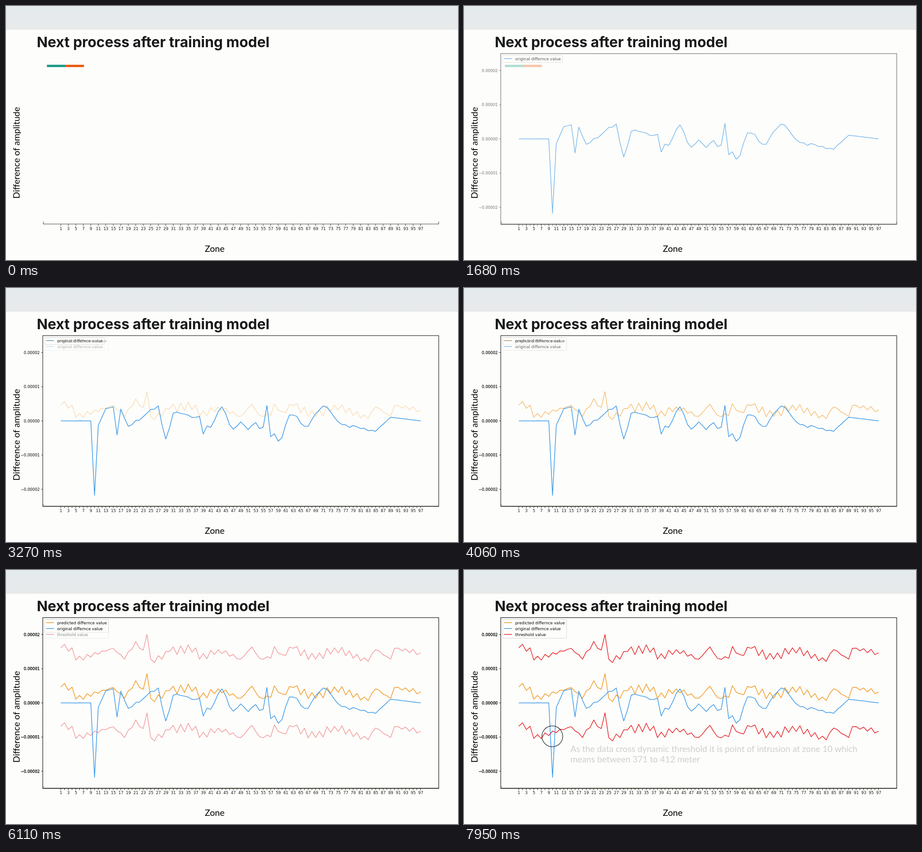
An HTML page with a canvas that plays this animation: 998 by 561 pixels, repeating every 7.99 s.

```html
<!DOCTYPE html>
<html lang="en">
<head>
<meta charset="utf-8">
<title>Next process after training model</title>
<style>
html, body { margin: 0; width: 100%; height: 100%; overflow: hidden; background: #fdfdfb; }
canvas { display: block; width: 998px; height: 561px; }
</style>
</head>
<body>
<canvas id="stage" width="998" height="561"></canvas>
<script>
const W = 998, H = 561, LOOP = 7990;
const START = 30, FADE = 2480;
const PAPER = '#fdfdfb', INK = '#333', DARK = '#141414';
const BLUE = '#3d99ea', ORANGE = '#f19a25', RED = '#e6252a';
const SMALL = '"DejaVu Sans", sans-serif', BODY = 'Lato, sans-serif';
const ZONES = 97, ZERO = 293.5, BAND = 86.6;

const zoneX = z => 121 + (z - 1) * 8.276;

function seeded(seed) {
  return () => {
    seed = (seed * 16807) % 2147483647;
    return seed / 2147483647;
  };
}

// Straight runs between [zone, rise] points, with a wobble on the zones between them
function series(points, wobble) {
  const rises = [];
  for (let i = 0; i + 1 < points.length; i++) {
    const [z0, r0] = points[i], [z1, r1] = points[i + 1];
    rises.push(r0);
    for (let z = z0 + 1; z < z1; z++) {
      rises.push(r0 + (r1 - r0) * (z - z0) / (z1 - z0) + wobble(z));
    }
  }
  rises.push(points[points.length - 1][1]);
  return rises;
}

const random = seeded(11);
const measured = series([
  [1, 0], [9, 0], [10, -164.5], [11, -10], [13, 27], [15, 31], [16, -31], [17, 26],
  [19, -12], [27, 33], [29, -40], [31, 17], [38, 10], [39, -29], [44, 31], [46, -8],
  [55, -14], [56, 34], [57, -35], [60, -37], [62, 13], [67, -12], [71, 33], [76, -8],
  [85, -23], [89, 8], [ZONES, 0]
], z => (random() - 0.5) * 20 * Math.sin(Math.PI * z / ZONES) ** 2);

// The zigzag swaps between odd and even zones about every 37 zones
const predicted = series([
  [1, 35], [4, 35], [5, 8], [15, 34], [18, 10], [21, 49], [23, 30], [24, 64.5],
  [25, 10], [28, 10], [30, 27], [37, 35], [38, 10], [43, 31], [49, 10], [52, 37],
  [54, 12], [57, 12], [58, 38], [60, 20], [63, 34], [69, 10], [74, 35], [83, 5],
  [85, 31], [89, 10], [90, 34], [ZONES, 24]
], z => -9 * Math.cos(Math.PI * z) * Math.cos(Math.PI * (z - 33) / 37));

function makeLayer(draw) {
  const c = document.createElement('canvas');
  c.width = W;
  c.height = H;
  draw(c.getContext('2d'));
  return c;
}

function text(g, str, x, y, font, color, align = 'left') {
  g.font = font;
  g.fillStyle = color;
  g.textAlign = align;
  g.fillText(str, x, y);
}

function line(g, x1, y1, x2, y2, color, width = 1) {
  g.strokeStyle = color;
  g.lineWidth = width;
  g.beginPath();
  g.moveTo(x1, y1);
  g.lineTo(x2, y2);
  g.stroke();
}

function curve(g, rises, color, shift = 0) {
  g.strokeStyle = color;
  g.lineWidth = 1.5;
  g.lineJoin = 'round';
  g.beginPath();
  rises.forEach((rise, i) => g.lineTo(zoneX(i + 1), ZERO - rise + shift));
  g.stroke();
}

function legend(g, width, rows) {
  g.fillStyle = PAPER;
  g.strokeStyle = '#d2d2d2';
  g.lineWidth = 1;
  g.beginPath();
  g.roundRect(85.5, 109.5, width, 2 + 13.1 * rows.length, 2);
  g.fill();
  g.stroke();
  rows.forEach(([name, color], i) => {
    const y = 116.3 + 13 * i;
    line(g, 88.5, y, 106, y, color, 1.5);
    text(g, name, 113, y + 3.2, '8.75px ' + SMALL, '#000');
  });
}

function axes(g, heavy) {
  const ink = heavy ? DARK : INK;
  g.fillStyle = PAPER;
  g.fillRect(33, 104, 924, 383);
  line(g, 82.5, 477, 82.5, 481, '#aaa');
  line(g, 82, 481.5, 955, 481.5, '#85856f');
  for (let z = 1; z <= ZONES; z++) line(g, zoneX(z), 483, zoneX(z), 486, ink);
  g.strokeStyle = ink;
  g.lineWidth = 1.2;
  g.strokeRect(81.2, 105.2, 874.3, 377.3);
  for (let k = -2; k <= 2; k++) {
    const y = ZERO - 75.5 * k;
    const label = (k < 0 ? '\u2212' : '') + '0.0000' + Math.abs(k);
    line(g, 78, y, 81, y, ink);
    text(g, label, 74.5, y + 3.3, '8.5px ' + SMALL, ink, 'right');
    if (heavy) {
      g.lineWidth = 0.4;
      g.strokeText(label, 74.5, y + 3.3);
    }
  }
}

const rowOrange = ['predicted differnce value', ORANGE];
const rowBlue = ['original differnce value', BLUE];
const rowRed = ['threshold value', RED];

const base = makeLayer(g => {
  g.fillStyle = PAPER;
  g.fillRect(0, 0, W, H);
  const head = g.createLinearGradient(0, 0, 0, 52);
  head.addColorStop(0, '#e4ecec');
  head.addColorStop(0.4, '#e6eaed');
  head.addColorStop(1, '#e8eaea');
  g.fillStyle = head;
  g.fillRect(0, 0, W, 52.5);

  text(g, 'Next process after training model', 68, 91, '700 31.62px Inter, sans-serif', '#181a1a');
  g.fillStyle = '#1a9988';
  g.fillRect(90.3, 129.8, 41.4, 5.1);
  g.fillStyle = '#e85a0c';
  g.fillRect(131.7, 129.8, 40.4, 5.1);

  line(g, 82, 481.5, 956, 481.5, '#444');
  line(g, 82.5, 476, 82.5, 482, '#444');
  line(g, 955.5, 476, 955.5, 482, '#444');
  for (let z = 1; z <= ZONES; z += 2) {
    line(g, zoneX(z), 482, zoneX(z), 486, '#444');
    text(g, z, zoneX(z) + 0.3, 495.3, '8.6px ' + SMALL, DARK, 'center');
  }

  text(g, 'Zone', 439, 542.5, '19.55px ' + BODY, '#000');
  g.translate(29.5, 425.5);
  g.rotate(-Math.PI / 2);
  text(g, 'Difference of amplitude', 0, 0, '19.55px ' + BODY, '#000');
});

const charts = [
  makeLayer(g => {
    axes(g, false);
    curve(g, measured, BLUE);
    legend(g, 132, [rowBlue]);
  }),
  makeLayer(g => {
    axes(g, true);
    curve(g, predicted, ORANGE);
    curve(g, measured, BLUE);
    legend(g, 141, [rowOrange, rowBlue]);
  }),
  makeLayer(g => {
    axes(g, true);
    curve(g, predicted, ORANGE);
    curve(g, measured, BLUE);
    curve(g, predicted, RED, -BAND);
    curve(g, predicted, RED, BAND);
    legend(g, 141, [rowOrange, rowBlue, rowRed]);
  })
];

const note = makeLayer(g => {
  const font = '19.12px ' + BODY;
  text(g, 'As the data cross dynamic threshold it is point of intrusion at zone 10 which', 235, 401.5, font, '#111');
  text(g, 'means between 371 to 412 meter', 235, 425, font, '#111');
});

const ctx = document.getElementById('stage').getContext('2d');

function render(t) {
  // The three charts and the note fade in one after another
  const fade = step => Math.min(1, Math.max(0, (t - START) / FADE - step));
  ctx.globalAlpha = 1;
  ctx.drawImage(base, 0, 0);
  [...charts, note].forEach((layer, i) => {
    ctx.globalAlpha = fade(i);
    if (ctx.globalAlpha > 0) ctx.drawImage(layer, 0, 0);
  });
  ctx.globalAlpha = 1;
  if (t >= START + 3 * FADE) {
    ctx.strokeStyle = '#000';
    ctx.lineWidth = 1.1;
    ctx.beginPath();
    ctx.arc(195, 367.3, 23, 0, 2 * Math.PI);
    ctx.stroke();
  }
}

const began = performance.now();
function tick() {
  render((performance.now() - began) % LOOP);
  requestAnimationFrame(tick);
}
tick();
</script>
</body>
</html>
```
